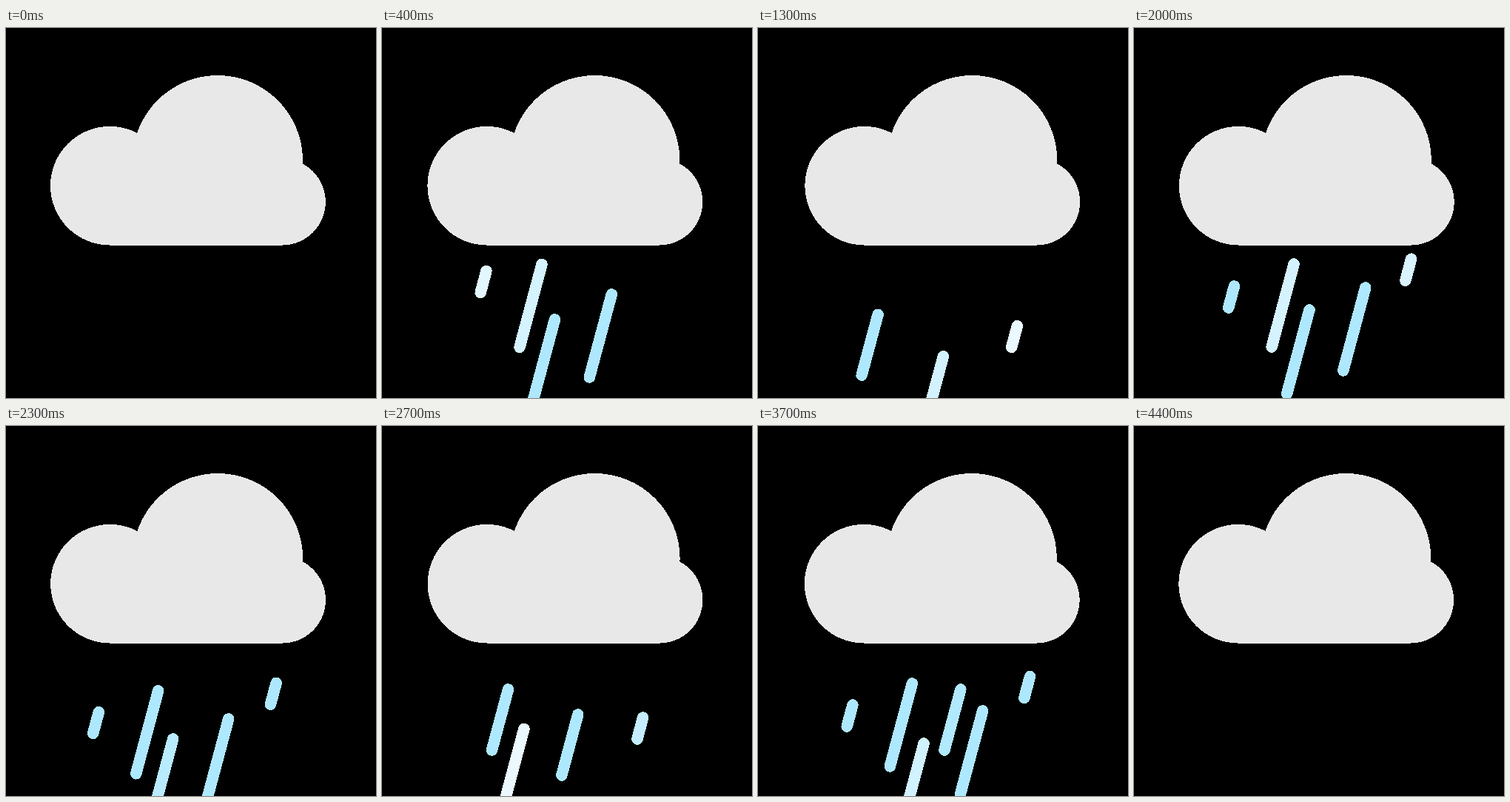
An HTML page for the animation above (4500 ms loop, 500 by 500 pixels).

```html
<!DOCTYPE html>
<html lang="en">
<head>
<meta charset="utf-8">
<title>Rain cloud</title>
<style>
  html, body { margin: 0; width: 100%; height: 100%; overflow: hidden; background: #000; }
  svg { display: block; width: 100vw; height: 100vh; }
  #rain { stroke-width: 15.5; stroke-linecap: round; }
</style>
</head>
<body>
<svg viewBox="0 0 500 500" shape-rendering="crispEdges">
  <g id="rain"></g>
  <g id="cloud" fill="#e8e8e8">
    <circle cx="140.3" cy="213.2" r="80.3"/>
    <circle cx="286" cy="179" r="115"/>
    <circle cx="373.3" cy="235" r="58.5"/>
    <rect x="140" y="200" width="234" height="93.5"/>
  </g>
</svg>
<script>
const LOOP = 4500, STEP = 100, SWAY = 2250, FADE = 150;
const SLOPE = 0.268;
const COLOR = [174, 232, 255];

// x, y: upper end at the start; len: height; v: px per ms; starts: one per shower
const drops = [
  { x: 142.7, y: 322, len: 29, v: 0.125, life: 800, starts: [348, 1784, 3260] },
  { x: 182, y: 313, len: 82, v: 0.112, life: 850, starts: [637, 2316, 3705] },
  { x: 218.8, y: 309, len: 112, v: 0.129, life: 815, starts: [320, 1922, 3398] },
  { x: 279.8, y: 334, len: 82, v: 0.153, life: 800, starts: [582, 2334, 3556] },
  { x: 319.7, y: 325, len: 112, v: 0.15, life: 720, starts: [167, 1827, 3300] },
  { x: 376.8, y: 304, len: 29, v: 0.117, life: 880, starts: [458, 1930, 3405] },
  { x: 246.6, y: 345, len: 113, v: 0.14, life: 686, starts: [50, 1743, 3100] }
];

const rain = document.getElementById("rain");
const cloud = document.getElementById("cloud");
for (const drop of drops) {
  drop.line = document.createElementNS("http://www.w3.org/2000/svg", "line");
  rain.append(drop.line);
}

function setAttributes(el, values) {
  for (const name in values) el.setAttribute(name, values[name]);
}

function drawDrop({ line, x, y, len, v, life, starts }, t) {
  const start = starts.findLast(s => s <= t);
  const end = Math.min(start + life, LOOP - STEP - 10);
  const visible = t > start && t < end;
  line.style.display = visible ? "" : "none";
  if (!visible) return;

  const fall = v * (t - start);
  const x1 = x - fall * SLOPE, y1 = y + fall;
  // Drops pale to white as they appear and vanish
  const strength = Math.min(1, (t - start) / FADE, (end - t) / FADE);
  const shade = COLOR.map(c => Math.round(255 + (c - 255) * strength));
  setAttributes(line, {
    x1, y1, x2: x1 - len * SLOPE, y2: y1 + len, stroke: `rgb(${shade})`
  });
}

function render(now) {
  const t = Math.floor((now % LOOP) / STEP) * STEP;
  const sway = 4 * (1 - Math.abs(1 - 2 * (t % SWAY) / SWAY));
  cloud.setAttribute("transform", `translate(${sway} 0)`);
  drops.forEach(drop => drawDrop(drop, t));
}

const begin = performance.now();
function tick() {
  render(performance.now() - begin);
  requestAnimationFrame(tick);
}
tick();
</script>
</body>
</html>
```
